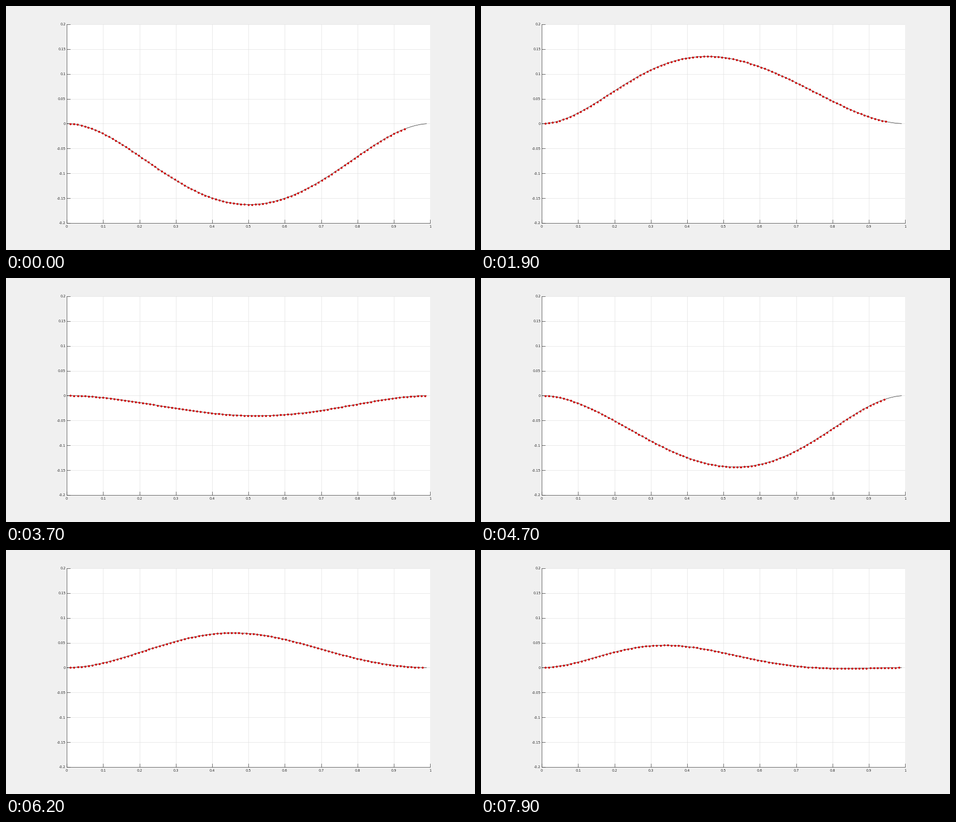
Write a matplotlib script that moves like this. It is 919 by 480 pixels and loops after 8000 ms.

```python
import numpy as np
import matplotlib.pyplot as plt
from matplotlib.animation import FuncAnimation

W, H, DPI = 919, 480, 100
FRAMES, STEP_MS = 80, 100
PX = 72 / DPI  # points per pixel
LEFT, RIGHT, TOP, BOTTOM = 119.2, 831.2, 35.9, 426.9
INK, GRID, RED = "#262626", "#dfdfdf", "#cc0000"
HAIRLINE = 0.7 * PX

plt.rcParams["font.family"] = "DejaVu Sans"


def mode(beta, x):
    """Clamped-clamped beam mode, scaled by the first mode's peak."""
    sigma = (np.cosh(beta) - np.cos(beta)) / (np.sinh(beta) - np.sin(beta))
    z = beta * x
    return (np.cosh(z) - np.cos(z) - sigma * (np.sinh(z) - np.sin(z))) / 1.588


def modes(x):
    return np.array([mode(beta, x) for beta in (4.730041, 7.853205, 10.995608)])


def amplitudes(t):
    """Slowly damped first mode that feeds energy into the next two."""
    phase = 1.372 * (t - 1.21) + 0.1 * np.sin(2.244 * (t - 3.72))
    a1 = 0.167 * np.exp(-0.028 * t) * np.sin(phase)
    growth = 0.0035 * t + 0.009 * np.exp(-((t - 2) / 1.2) ** 2)
    a2 = -growth * np.sin(3.99 * (t - 3.74))
    a3 = 0.003 * np.sin(t - 0.6)
    return np.array([a1, a2, a3])


x_line = np.arange(100) / 100
x_fine = np.linspace(0.01, 1, 991)
arc_nodes = np.arange(99) / 100
line_modes, fine_modes = modes(x_line), modes(x_fine)

fig = plt.figure(figsize=(W / DPI, H / DPI), dpi=DPI, facecolor="#f0f0f0")
ax = fig.add_axes([LEFT / W, 1 - BOTTOM / H, (RIGHT - LEFT) / W, (BOTTOM - TOP) / H])
ax.set(xlim=(0, 1), ylim=(-0.2, 0.2))
ax.set_xticks(np.arange(11) / 10, [f"{v / 10:g}" for v in range(11)])
ax.set_yticks(np.arange(-4, 5) / 20, [f"{v / 20:g}" for v in range(-4, 5)])
ax.grid(True, color=GRID, lw=HAIRLINE)
ax.set_axisbelow(True)
ax.tick_params(direction="in", length=7 * PX, width=HAIRLINE, color=INK,
               labelcolor=INK, labelsize=6.67 * PX)
ax.tick_params(axis="x", pad=4.1 * PX)
ax.tick_params(axis="y", pad=2.3 * PX)
for side in ("top", "right"):
    ax.spines[side].set_visible(False)
for side in ("left", "bottom"):
    ax.spines[side].set(color=INK, linewidth=HAIRLINE)

beam, = ax.plot([], [], color="black", lw=0.65 * PX, zorder=3)
nodes, = ax.plot([], [], ls="", marker="o", ms=4 * PX, mfc=RED, mec="none",
                 zorder=4, clip_on=False)


def draw(frame):
    amps = amplitudes(frame * STEP_MS / 1000)
    beam.set_data(x_line, amps @ line_modes)
    # Nodes keep equal spacing along the bent beam.
    y = amps @ fine_modes
    arc = np.concatenate([[0], np.cumsum(np.hypot(np.diff(x_fine), np.diff(y)))])
    x_nodes = np.interp(arc_nodes, arc, x_fine)
    nodes.set_data(x_nodes, np.interp(x_nodes, x_fine, y))
    return beam, nodes


anim = FuncAnimation(fig, draw, frames=FRAMES, interval=STEP_MS, repeat=True,
                     repeat_delay=0)
plt.show()
```
